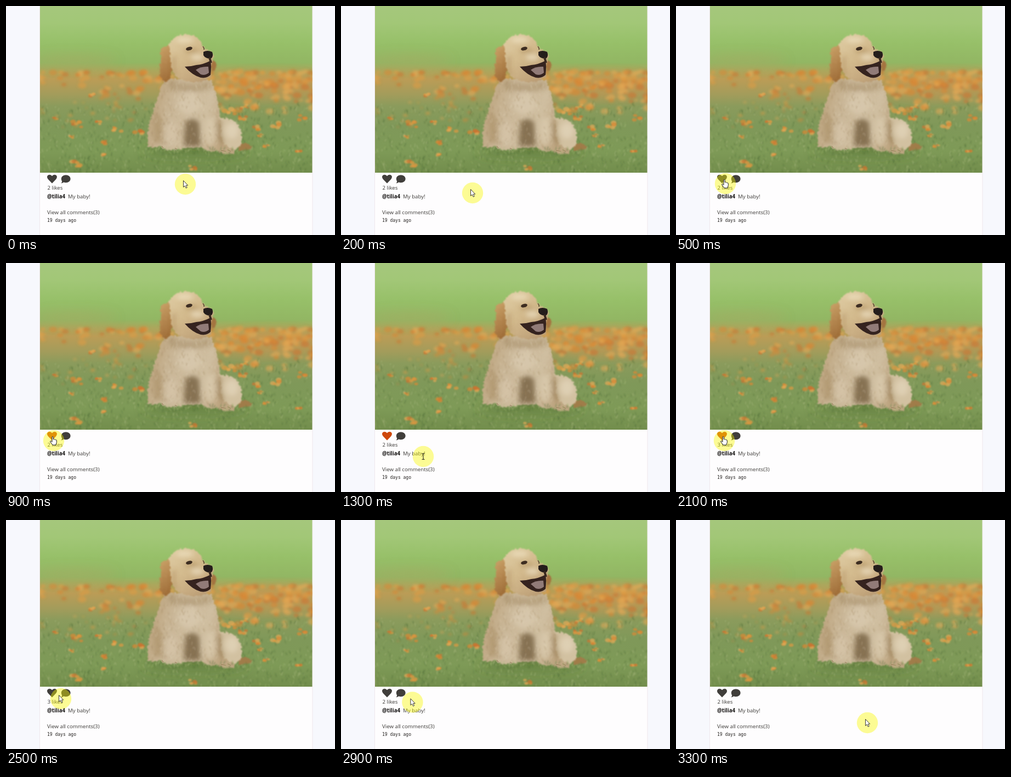
Animation, 600 px wide and 419 px high, one loop 3.4 s. Source, as an HTML page:

```html
<!DOCTYPE html>
<html lang="en">
<head>
<meta charset="utf-8">
<title>Liking a post</title>
<style>
  html, body { margin: 0; width: 100%; height: 100%; overflow: hidden; background: #f7f8fd; }
  svg { display: block; width: 600px; height: 419px; }
  text { font: 9.7px "Open Sans", sans-serif; fill: #3b3936; }
  .user { font-weight: 700; fill: #171514; }
  .age { font: 8px "DejaVu Sans Mono", monospace; fill: #24211f; }
</style>
</head>
<body>
<svg viewBox="0 0 600 419">
  <defs>
    <linearGradient id="field" x2="0" y2="1">
      <stop offset="0" stop-color="#a5c77c"/>
      <stop offset=".1" stop-color="#a2c777"/>
      <stop offset=".22" stop-color="#97c069"/>
      <stop offset=".34" stop-color="#92b663"/>
      <stop offset=".39" stop-color="#aca65c"/>
      <stop offset=".44" stop-color="#bb9c56"/>
      <stop offset=".53" stop-color="#a39c5b"/>
      <stop offset=".6" stop-color="#8b9b5c"/>
      <stop offset=".72" stop-color="#7f9859"/>
      <stop offset=".87" stop-color="#7e9a57"/>
      <stop offset="1" stop-color="#728d4c"/>
    </linearGradient>
    <linearGradient id="coat" x2="1" y2=".25">
      <stop offset="0" stop-color="#b79c73"/>
      <stop offset=".35" stop-color="#cab798"/>
      <stop offset=".75" stop-color="#cfbea0"/>
      <stop offset="1" stop-color="#bea682"/>
    </linearGradient>
    <linearGradient id="face" x2=".7" y2="1">
      <stop offset="0" stop-color="#dfcda5"/>
      <stop offset=".5" stop-color="#d3ba8d"/>
      <stop offset="1" stop-color="#bea078"/>
    </linearGradient>
    <linearGradient id="ear" x2=".3" y2="1">
      <stop offset="0" stop-color="#cba369"/>
      <stop offset="1" stop-color="#a06e39"/>
    </linearGradient>
    <filter id="haze" x="-30%" y="-30%" width="160%" height="160%"><feGaussianBlur stdDeviation="10"/></filter>
    <filter id="far"><feGaussianBlur stdDeviation="2"/></filter>
    <filter id="near"><feGaussianBlur stdDeviation=".9"/></filter>
    <filter id="soft" x="-30%" y="-30%" width="160%" height="160%"><feGaussianBlur stdDeviation="4"/></filter>
    <filter id="edge"><feGaussianBlur stdDeviation=".7"/></filter>
    <filter id="fluff" color-interpolation-filters="sRGB">
      <feTurbulence type="fractalNoise" baseFrequency=".2" numOctaves="2" result="noise"/>
      <feDisplacementMap in="SourceGraphic" in2="noise" scale="7" xChannelSelector="R" yChannelSelector="G"/>
      <feGaussianBlur stdDeviation=".9"/>
    </filter>
    <clipPath id="frame"><path d="M62 0H558.5V305H62Z"/></clipPath>
    <path id="torso" d="M289 133C279 155 276 174 267 196C259 216 256 240 259 256Q267 262 282 257Q288 265 306 263Q316 266 323 260L355 258Q362 266 384 266Q393 272 415 270Q420 264 409 259Q395 254 393 239L391 213C390 187 384 160 374 136Z"/>
    <clipPath id="inside"><use href="#torso"/></clipPath>
  </defs>

  <rect width="600" height="419" fill="#f7f8fd"/>
  <path d="M61.5 -1H559V420H61.5Z" fill="#fefdfe" stroke="#efe7ec"/>

  <g clip-path="url(#frame)">
    <rect x="62" width="497" height="305" fill="url(#field)"/>
    <g filter="url(#haze)">
      <ellipse cx="125" cy="100" rx="75" ry="10" fill="#b0a562" opacity=".4"/>
      <ellipse cx="480" cy="148" rx="90" ry="22" fill="#c99450" opacity=".45"/>
      <ellipse cx="345" cy="266" rx="95" ry="8" fill="#4f6a2c" opacity=".6"/>
    </g>
    <g id="petals" filter="url(#far)"/>
    <g id="grass" filter="url(#near)"/>

    <g filter="url(#fluff)">
      <path d="M425 251Q440 249 449 258Q447 264 424 265Z" fill="#a07c49"/>
      <path d="M384 207C407 200 428 212 430 238C431 255 424 266 405 266L378 262Z" fill="#d2c1a1"/>
      <use href="#torso" fill="url(#coat)"/>
      <path d="M283 92C279 78 291 70 302 73L307 96C303 111 302 136 293 140C281 138 276 118 283 92Z" fill="url(#ear)"/>
      <path d="M373 96Q385 101 382 113Q380 121 375 119Z" fill="#a47440"/>
      <path d="M298 70C305 56 321 50 335 53C349 54 357 63 361 78C373 81 380 87 379 95L374 107L373 130Q366 138 352 139C332 141 310 135 304 119C299 104 300 89 298 70Z" fill="url(#face)"/>
    </g>

    <g filter="url(#soft)">
      <path d="M300 135Q334 150 372 135L378 151Q335 163 294 149Z" fill="#9b8159" opacity=".4"/>
      <path d="M327 213Q339 201 352 213L355 257H324Z" fill="#6f5a3a" opacity=".75"/>
      <path d="M273 192Q266 220 270 250L284 252Q288 221 281 201Z" fill="#a08457" opacity=".45"/>
      <path d="M391 210Q385 230 396 252" fill="none" stroke="#8c7047" stroke-width="6" opacity=".65"/>
      <ellipse cx="334" cy="178" rx="22" ry="20" fill="#dfd2ba" opacity=".5"/>
      <ellipse cx="302" cy="232" rx="10" ry="22" fill="#dacbb0" opacity=".55"/>
      <ellipse cx="373" cy="229" rx="10" ry="26" fill="#dfd1b6" opacity=".6"/>
      <ellipse cx="412" cy="228" rx="12" ry="15" fill="#e6d9bf" opacity=".6"/>
      <ellipse cx="326" cy="62" rx="16" ry="5" fill="#efe3c3" opacity=".7"/>
      <ellipse cx="349" cy="94" rx="12" ry="6" fill="#ecdfc3" opacity=".7"/>
      <path d="M307 92Q304 112 309 126" fill="none" stroke="#946d3b" stroke-width="4" opacity=".5"/>
      <ellipse cx="338" cy="82" rx="13" ry="5" fill="#a78555" opacity=".45"/>
    </g>
    <g clip-path="url(#inside)"><g id="fur" filter="url(#near)"/></g>

    <g filter="url(#edge)">
      <path d="M326 111Q337 111 347 108Q360 107 373 100Q375 111 373 126Q366 133 355 131Q340 127 326 111Z" fill="#35231f"/>
      <path d="M346 117Q355 110 369 111L370 122Q363 128 355 125Z" fill="#917b78"/>
      <path d="M360 84Q367 80 376 84Q379 92 374 96Q364 97 360 90Z" fill="#241d1b"/>
      <path d="M371 94L374 104" stroke="#39291f" stroke-width="4"/>
      <ellipse cx="334" cy="78" rx="6" ry="3.2" transform="rotate(-14 334 78)" fill="#3d2d21"/>
      <path d="M359 74Q362 77 361 80" fill="none" stroke="#5f4a35" stroke-width="1.5"/>
      <path d="M392 264l9 2M404 263l6 3M284 256l3 4M308 260l4 2" stroke="#967e59"/>
    </g>
    <g id="blades" filter="url(#near)"/>
  </g>

  <path id="heart" d="M84 324.4L76.8 317C71.6 311 79 305.5 84 311.3C89 305.5 96.4 311 91.2 317Z"/>
  <path d="M109.2 309.2C114 309.2 117.6 312.2 117.6 316.2S114 323.2 109.2 323.2Q107 323.2 105.2 322.6Q103.1 324.4 100.6 324.4Q102 322.6 102.2 320.5Q100.8 318.8 100.8 316.2C100.8 312.2 104.4 309.2 109.2 309.2Z" fill="#403e3b"/>
  <text id="likes" x="75.5" y="336"></text>
  <text class="user" x="75" y="352">@tilia4</text>
  <text x="113" y="352">My baby!</text>
  <text x="75" y="381">View all comments(3)</text>
  <text class="age" x="75" y="395">19 days ago</text>

  <g id="pointer">
    <circle r="19.2" fill="#f8f800" fill-opacity=".42"/>
    <path id="arrow" d="M-3.5 -6.5V5.4L-.8 3L1.2 7.2L3.2 6.3L1.3 2.2H4.7Z" fill="#fff" stroke="#27251f" stroke-width=".9"/>
    <path id="hand" d="M-3 -6.8Q-1.6 -8.2 -.7 -6.5V-2.4Q.6 -3.4 1.4 -2Q2.7 -2.8 3.4 -1.4Q5.2 -1.8 5.3 .2V3.4L3.8 8H-2L-6.4 2Q-6.3 .1 -4.6 .8L-3 2.4Z" fill="#fff" stroke="#191816"/>
    <path id="beam" d="M-2.5 -5.5Q0 -5.5 0 -4.2Q0 -5.5 2.5 -5.5M0 -4.2V4.2M-2.5 5.5Q0 5.5 0 4.2Q0 5.5 2.5 5.5" fill="none" stroke="#2a2922" stroke-width="1.1"/>
  </g>
</svg>
<script>
const $ = id => document.getElementById(id);
const LOOP = 3400, STEP = 100;

let seed = 71;
const random = () => (seed = seed * 16807 % 2147483647) / 2147483647;
const between = (a, b) => a + (b - a) * random();
const pick = list => list[Math.floor(random() * list.length)];

function add(parent, tag, attributes) {
  const node = document.createElementNS("http://www.w3.org/2000/svg", tag);
  for (const key in attributes) node.setAttribute(key, attributes[key]);
  parent.append(node);
}

function petal(parent, cx, cy, rx, opacity) {
  add(parent, "ellipse", {
    cx, cy, rx, ry: rx * .7, opacity,
    fill: pick(["#e09a42", "#d98734", "#e3a957", "#cc7430"])
  });
}

function blade(parent, x, y, colors, opacity) {
  add(parent, "path", {
    d: `M${x} ${y}l${between(-3, 3)} ${between(-7, -3)}`,
    stroke: pick(colors), "stroke-width": 1.5, opacity
  });
}

function plantMeadow() {
  const greens = ["#aebb83", "#94ad66", "#5d7b42", "#4d6a36"];
  for (let i = 0; i < 150; i++)
    petal($("petals"), between(60, 560), 121 + 50 * random() ** 1.7, between(3, 8), .55);
  for (let i = 0; i < 60; i++)
    petal($("petals"), between(385, 560), between(118, 195), between(3, 9), .6);
  for (let i = 0; i < 26; i++)
    petal($("petals"), between(64, 270), between(165, 225), between(2, 5), .45);
  for (let i = 0; i < 900; i++)
    blade($("grass"), between(62, 558), 180 + 128 * random() ** .8, greens, .45);

  const fallen = [[155,163,9], [90,206,6], [131,216,13], [168,213,7], [203,226,11], [244,230,13],
    [120,240,7], [179,248,10], [177,273,10], [128,289,13], [341,296,9], [455,223,10], [475,255,7],
    [532,266,8], [540,204,11], [490,218,13], [435,184,9], [408,194,14], [432,205,11], [464,237,6]];
  for (const [x, y, r] of fallen)
    for (let i = 0; i < 6; i++)
      petal($("grass"), x + between(-.7, .7) * r, y + between(-.4, .4) * r, between(.25, .45) * r, .7);
  for (let x = 256; x < 450; x += 3) blade($("blades"), x, between(263, 272), greens, .5);
}

function brushFur() {
  for (let i = 0; i < 350; i++)
    blade($("fur"), between(258, 395), between(140, 268), ["#e6dac2", "#dccbab", "#a58a61", "#947a54"], .25);
}

// time, x, y
const path = [[0,327,326], [100,310,332], [200,240,342], [300,150,340], [400,98,328], [500,90,325],
  [900,87,325], [1000,100,335], [1100,140,356], [1200,157,364], [1300,150,354], [1400,149,359],
  [1700,119,338], [1800,96,328], [1900,88,325], [2300,88,325], [2500,100,327], [3000,138,335],
  [3100,200,350], [3200,310,368], [3300,349,371]];

function pointerAt(t) {
  const next = Math.max(1, path.findIndex(key => key[0] >= t));
  const [t0, x0, y0] = path[next - 1], [t1, x1, y1] = path[next];
  const k = (t - t0) / (t1 - t0);
  return [x0 + (x1 - x0) * k, y0 + (y1 - y0) * k];
}

function shapeAt(t) {
  if ((t >= 400 && t < 1000) || (t >= 1800 && t < 2500)) return "hand";
  return t >= 1000 && t < 1800 ? "beam" : "arrow";
}

function draw(time) {
  const t = Math.floor(time % LOOP / STEP) * STEP;
  $("pointer").setAttribute("transform", `translate(${pointerAt(t)})`);
  for (const shape of ["arrow", "hand", "beam"])
    $(shape).setAttribute("visibility", shape === shapeAt(t) ? "visible" : "hidden");
  $("heart").setAttribute("fill", t >= 800 && t < 2200 ? "#ce480c" : "#403e3b");
  $("likes").textContent = (t >= 1500 && t < 2800 ? 3 : 2) + " likes";
}

plantMeadow();
brushFur();
draw(0);
let start;
requestAnimationFrame(function tick(now) {
  start ??= now;
  draw(now - start);
  requestAnimationFrame(tick);
});
</script>
</body>
</html>
```
